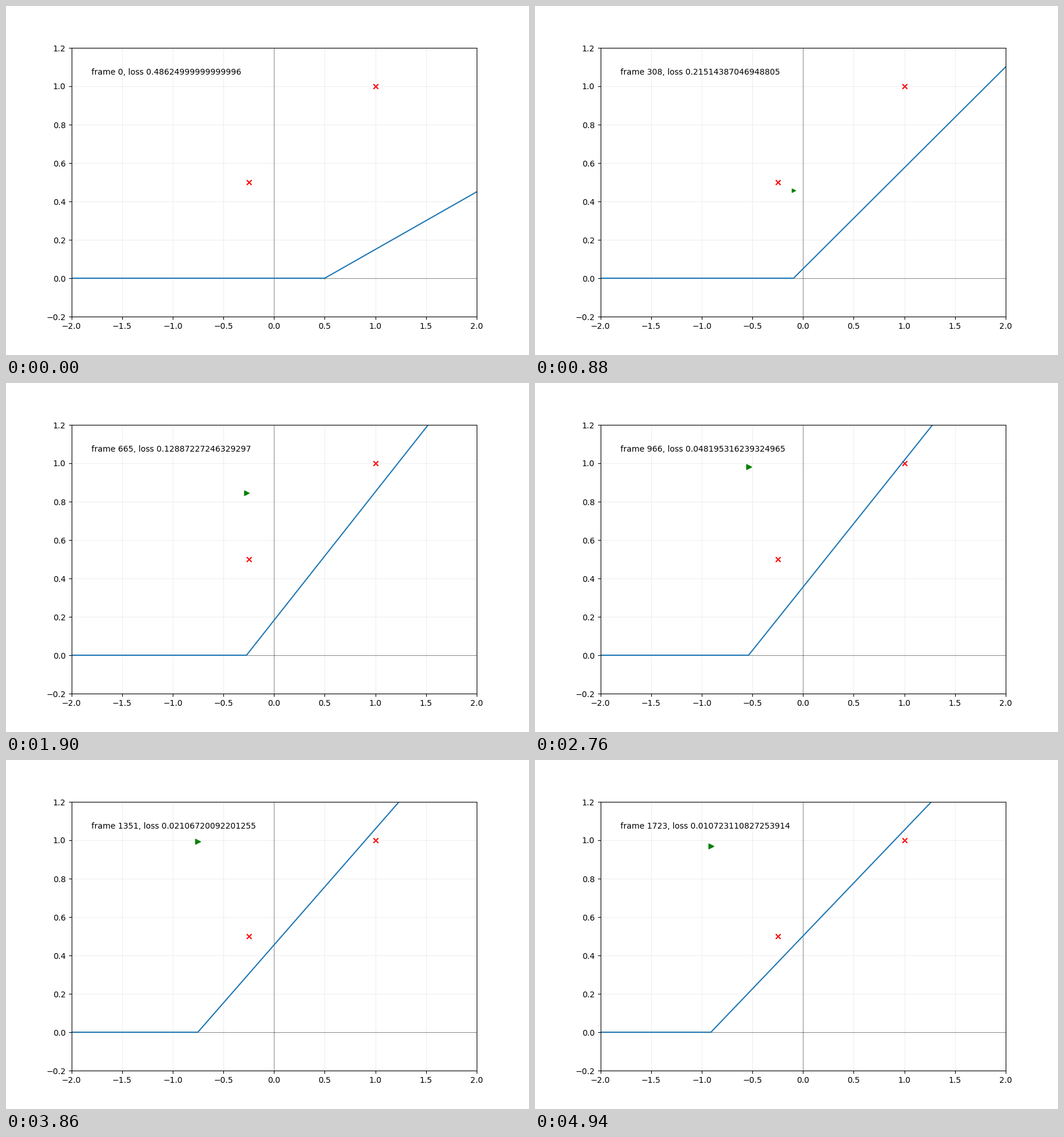
Write a matplotlib script that moves like this. It is 900 px wide and 600 px high and loops after 4.96 s.

```python
import numpy as np
import matplotlib.pyplot as plt
from matplotlib.animation import FuncAnimation

# One ReLU neuron, a * relu(w x + b), fitted to two points by gradient descent.
X = np.array([-0.25, 1.0])
Y = np.array([0.5, 1.0])
RATE, DECAY = 0.001, 0.01
STEPS, STRIDE = 1723, 7
FRAMES = 248


def train():
    w, b, a = 0.3, -0.15, 1.0
    history = []
    for _ in range(STEPS + 1):
        pre = w * X + b
        hidden = np.maximum(pre, 0)
        err = a * hidden - Y
        history.append((a * w, a * b, float(np.mean(err ** 2))))
        back = err * a * (pre > 0)
        grad_w = np.sum(back * X) + DECAY * w
        grad_b = np.sum(back) + DECAY * b
        grad_a = np.sum(err * hidden) + DECAY * a
        w -= RATE * grad_w
        b -= RATE * grad_b
        a -= RATE * grad_a
    return np.array(history).T


slope, offset, loss = train()
knee = -offset / slope
norm = np.hypot(slope, offset)
height = (norm - norm[0]) / (norm.max() - norm[0])

fig, ax = plt.subplots(figsize=(9, 6), dpi=100)
ax.set_xlim(-2, 2)
ax.set_ylim(-0.2, 1.2)
ax.grid(alpha=0.2)
ax.axhline(0, color="black", lw=0.8, alpha=0.4)
ax.axvline(0, color="black", lw=0.8, alpha=0.4)
ax.scatter(X, Y, marker="x", color="red")
neuron = ax.scatter([0], [0], marker=">", color="green")
curve, = ax.plot([], [], color="C0", lw=1.5)
label = ax.text(-1.8, 1.06, "")


def update(i):
    n = min(i * STRIDE, STEPS)
    xs = np.array([-2, knee[n], 2])
    curve.set_data(xs, np.maximum(slope[n] * xs + offset[n], 0))
    neuron.set_offsets([[knee[n], height[n]]])
    neuron.set_sizes([1 + 40 * height[n]])
    label.set_text(f"frame {n}, loss {loss[n]}")
    return curve, neuron, label


anim = FuncAnimation(fig, update, frames=FRAMES, interval=20,
                     repeat=True, repeat_delay=0)
plt.show()
```
